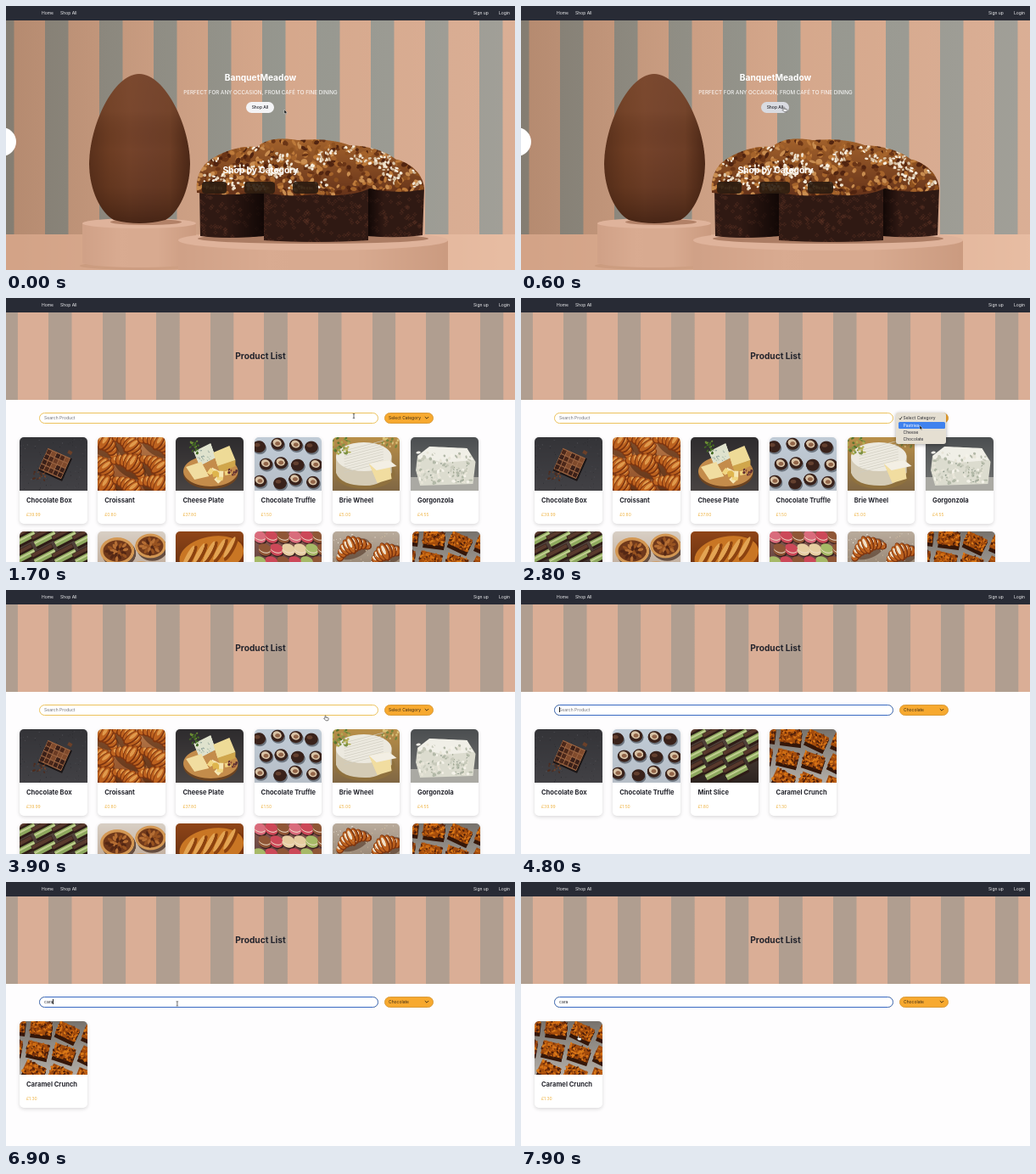
These frames come from a looping animation (600x311 px, 8000 ms). An HTML page with a canvas:

```html
<!DOCTYPE html>
<html lang="en">
<head>
<meta charset="utf-8">
<title>Food shop</title>
<style>
html, body { margin: 0; width: 100%; height: 100%; overflow: hidden; background: #fff; }
#stage { position: relative; width: 600px; height: 311px; overflow: hidden; background: #fefdfe;
  font: 5px/8px Inter, sans-serif; color: #24252d; }
#stage *, #stage ::before { box-sizing: border-box; }
#stage div, #stage canvas, #stage svg, #stage b { position: absolute; white-space: nowrap; }
.fill { inset: 0; }
.mid { left: 0; width: 600px; text-align: center; }
.big { font-size: 10.2px; line-height: 12px; font-weight: 700; }
.stripes { left: 0; top: 17px; width: 600px;
  background: repeating-linear-gradient(90deg, var(--grey) var(--a), var(--grey) var(--b), var(--tan) calc(var(--b) + 1px), var(--tan) var(--c)); }
.nav { left: 0; top: 0; width: 600px; height: 17px; background: #282b35; color: #f1f1f3; }
.nav div { top: 4px; }
.step { animation: 8s step-end infinite; }

/* Landing page */
#home { animation-name: home; color: #fff; background: #dcae90; }
#home .stripes { height: 252px; --grey: #96978f; --tan: #d6a88c; --a: -18px; --b: 9px; --c: 46px; }
#home .light { left: 0; top: 17px; width: 600px; height: 252px;
  background: linear-gradient(90deg, #50301a40, #50301a18 30%, #fff0 55%, #ffe4e01c); }
.button { left: 283px; top: 113px; width: 33px; height: 13px; border-radius: 7px; background: #f4f4f6;
  color: #24252d; text-align: center; line-height: 13.5px; font-weight: 500; animation-name: hover; }
.pill { top: 207px; height: 14px; border-radius: 4px; background: #2b1c10e8; color: #493522; text-align: center; line-height: 14px; }
.bubble { left: -22px; top: 143px; width: 34px; height: 34px; border-radius: 50%; background: #fff; }

/* Product list */
#shop .stripes { height: 102.5px; --grey: #b09e90; --tan: #daae96; --a: -13.6px; --b: 13.4px; --c: 50px; }
.search { left: 39px; top: 134.5px; width: 400px; height: 13px; border: 1px solid #ecc25c; border-radius: 7px; background: #fff; }
.focus { border: 1.4px solid #3869c2; animation-name: focus; }
.hint { left: 45px; top: 137px; color: #6e6f76; animation-name: hint; }
.typed { left: 45px; top: 137px; }
.typed span { font-size: 0; }
.typed i { border-left: .7px solid #222; font-size: 5px; animation-name: caret; }
.select { left: 446px; top: 134.5px; width: 58px; height: 13px; border-radius: 7px; background: #f7a92f; border: .5px solid #d99a38; }
.label { left: 451px; top: 137px; color: #3d2b14; }
.menu { left: 442px; top: 135px; width: 59px; height: 37px; border-radius: 3px; background: #e5dfd2;
  box-shadow: 0 1px 4px #0005; animation-name: menu; }
.menu div { left: 8.5px; }
.menu .lit { left: 3px; top: 11px; width: 54.5px; height: 8px; padding-left: 5.5px; border-radius: 1.5px; background: #3f82ee; color: #fff; }
.all { animation-name: all; }
.choc { animation-name: choc; }
.found { animation-name: found; }
.card { width: 79.5px; height: 102px; border-radius: 5px; background: #fff; box-shadow: 0 1.5px 4px #00000026; overflow: hidden; }
.card canvas { left: 0; top: 0; width: 79.5px; height: 63px; }
.card b { left: 8px; top: 70px; font-size: 7.6px; line-height: 10px; }
.card div { left: 8px; top: 86.5px; color: #eeb343; }

/* Pointer */
#pointer { left: 0; top: 0; width: 1px; height: 1px; animation: move 8s ease-in-out infinite; }
#pointer svg { left: -6px; top: -6px; width: 16px; height: 16px; }
@keyframes move {
  0%, 1% { transform: translate(328px, 122px); }
  6.25%, 17% { transform: translate(309.5px, 119px); }
  21.25% { transform: translate(410px, 139px); }
  27.5%, 30% { transform: translate(472px, 141px); }
  35%, 37.5% { transform: translate(470px, 150px); }
  41%, 43% { transform: translate(462px, 165px); }
  48.75% { transform: translate(376px, 148px); }
  54%, 85% { transform: translate(210px, 141px); }
  92.5%, 100% { transform: translate(67px, 181px); }
}
.arrow { animation-name: arrow; }
.hand { animation-name: hand; }
.beam { animation-name: beam; }
@keyframes arrow { 0%, 25% { opacity: 1; } 4%, 42%, 100% { opacity: 0; } }
@keyframes hand { 0%, 19%, 52% { opacity: 0; } 4%, 42%, 91%, 100% { opacity: 1; } }
@keyframes beam { 0%, 25%, 57%, 91%, 100% { opacity: 0; } 19%, 52%, 85% { opacity: 1; } }

@keyframes home { 0% { opacity: 1; } 8.75%, 100% { opacity: 0; } }
@keyframes hover { 0% { background: #f4f4f6; } 5%, 100% { background: #d9dbe1; } }
@keyframes all { 0%, 50%, 100% { opacity: 0; } 11.25% { opacity: 1; } }
@keyframes choc { 0%, 71.25%, 100% { opacity: 0; } 50% { opacity: 1; } }
@keyframes found { 0% { opacity: 0; } 71.25%, 100% { opacity: 1; } }
@keyframes menu { 0%, 41.25%, 100% { opacity: 0; } 28.75% { opacity: 1; } }
@keyframes before { 0% { opacity: 1; } 50%, 100% { opacity: 0; } }
@keyframes after { 0% { opacity: 0; } 50%, 100% { opacity: 1; } }
@keyframes focus { 0% { opacity: 0; } 53.75%, 100% { opacity: 1; } }
@keyframes hint { 0% { opacity: 1; } 61.25%, 100% { opacity: 0; } }
@keyframes caret { 0%, 88%, 96%, 100% { opacity: 0; } 53.75%, 92% { opacity: 1; } }
@keyframes key1 { 61.25%, 100% { font-size: 5px; } }
@keyframes key2 { 71.25%, 100% { font-size: 5px; } }
@keyframes key3 { 77.5%, 100% { font-size: 5px; } }
@keyframes key4 { 83.75%, 100% { font-size: 5px; } }
</style>
</head>
<body>
<div id="stage">
  <div id="shop" class="fill">
    <div class="stripes"></div>
    <div class="mid big" style="top:62px">Product List</div>
    <div class="search"></div>
    <div class="search focus step"></div>
    <div class="hint step">Search Product</div>
    <div class="typed"><span class="step" style="animation-name:key1">c</span><span class="step" style="animation-name:key2">a</span><span class="step" style="animation-name:key3">r</span><span class="step" style="animation-name:key4">a</span><i class="step"></i></div>
    <div class="select"></div>
    <div class="label step" style="animation-name:before">Select Category</div>
    <div class="label step" style="animation-name:after">Chocolate</div>
    <svg style="left:493px;top:138px" width="6" height="6"><path d="M.8 2L3 4.2L5.2 2" fill="none" stroke="#3d2b14" stroke-width=".9"/></svg>
    <div class="all fill step"></div>
    <div class="choc fill step"></div>
    <div class="found fill step"></div>
    <div class="menu step">
      <div style="top:2px">Select Category</div>
      <div class="lit">Pastries</div>
      <div style="top:19px">Cheese</div>
      <div style="top:27px">Chocolate</div>
      <svg style="left:3px;top:3.5px" width="5" height="5"><path d="M.8 2.8L2 4.2L4.2 .8" fill="none" stroke="#222" stroke-width=".8"/></svg>
    </div>
  </div>

  <div id="home" class="fill step">
    <div class="stripes"></div>
    <div class="light"></div>
    <canvas id="hero" style="left:0;top:0;width:600px;height:311px"></canvas>
    <div class="mid big" style="top:78px">BanquetMeadow</div>
    <div class="mid" style="top:97.5px;font-size:6.25px">PERFECT FOR ANY OCCASION, FROM CAFÉ TO FINE DINING</div>
    <div class="button step">Shop All</div>
    <div class="pill" style="left:231px;width:29px">Pastries</div>
    <div class="pill" style="left:281px;width:36px">Chocolate</div>
    <div class="pill" style="left:338px;width:30px">Cheese</div>
    <div class="mid big" style="top:187px">Shop by Category</div>
    <div class="bubble"></div>
  </div>

  <div class="nav">
    <div style="left:42px">Home</div><div style="left:64px">Shop All</div>
    <div style="left:551px">Sign up</div><div style="left:581px">Login</div>
  </div>

  <div id="pointer">
    <svg class="arrow step" viewBox="-6 -6 16 16"><path d="M0 0V5L1.2 4L2 5.8L2.9 5.4L2.1 3.7H3.6Z" fill="#111" stroke="#fff" stroke-width=".4"/></svg>
    <svg class="hand step" viewBox="-6 -6 16 16"><path d="M0 .5Q.6-.4 1.1.5V2.2L3.8 2.7Q4.4 3 4.2 4L3.6 5.8H1L-1.2 3.4Q-1 2.7 0 3.2Z" fill="#fff" stroke="#222" stroke-width=".6"/></svg>
    <svg class="beam step" viewBox="-6 -6 16 16"><path d="M-1.2-2.6Q0-2.6 0-2V2Q0 2.6-1.2 2.6M1.2-2.6Q0-2.6 0-2M0 2Q0 2.6 1.2 2.6" fill="none" stroke="#222" stroke-width=".7"/></svg>
  </div>
</div>

<script>
const TAU = Math.PI * 2;
let seed = 1;
const rand = (lo = 0, hi = 1) => {
  seed = seed * 16807 % 2147483647;
  return lo + (hi - lo) * seed / 2147483647;
};
const pick = list => list[Math.floor(rand(0, list.length))];
const repeat = (n, draw) => { for (let i = 0; i < n; i++) draw(i); };

function blob(c, x, y, rx, ry, fill, turn = 0) {
  c.fillStyle = fill;
  c.beginPath();
  c.ellipse(x, y, rx, ry, turn, 0, TAU);
  c.fill();
}
function shape(c, path, fill) {
  c.fillStyle = fill;
  c.fill(new Path2D(path));
}
function blend(gradient, ...colours) {
  colours.forEach((colour, i) => gradient.addColorStop(i / (colours.length - 1), colour));
  return gradient;
}
function placed(c, x, y, turn, draw) {
  c.save();
  c.translate(x, y);
  c.rotate(turn);
  draw();
  c.restore();
}
function block(c, x, y, w, h, turn, fill) {
  placed(c, x, y, turn, () => { c.fillStyle = fill; c.fillRect(-w / 2, -h / 2, w, h); });
}
function ground(c, top, bottom = top) {
  c.fillStyle = blend(c.createLinearGradient(0, 0, 0, 63), top, bottom);
  c.fillRect(0, 0, 80, 63);
}
function specks(c, n, x, y, w, h, size, colours) {
  repeat(n, () => blob(c, x + rand(0, w), y + rand(0, h), rand(.4, 1) * size, rand(.3, .7) * size, pick(colours), rand(0, 3)));
}
function croissant(c, x, y, size, turn, dust) {
  placed(c, x, y, turn, () => {
    blob(c, 1, 4 * size, 15 * size, 8 * size, '#3a1a0a77');
    for (const k of [-4, 4, -3, 3, -2, 2, -1, 1, 0]) {
      const px = k * 3.3 * size, py = k * k * .4 * size, tall = (8.5 - Math.abs(k) * 1.3) * size;
      blob(c, px, py, 3.6 * size, tall, '#7e3510', k * .12);
      blob(c, px - .4, py - .6, 2.7 * size, tall * .88, '#bd621f', k * .12);
      blob(c, px - .6, py - 2 * size, 1.4 * size, tall * .5, dust || '#e09a4c', k * .12);
    }
  });
}

const pictures = {
  box(c) {
    ground(c, '#343438', '#424145');
    specks(c, 90, 0, 0, 80, 63, .7, ['#55545a', '#29292d']);
    placed(c, 41, 31, .42, () => {
      block(c, 1, 1, 31, 29, 0, '#1a1516');
      block(c, 0, 0, 29, 27, 0, '#9a6442');
      repeat(20, i => block(c, -11.5 + i % 5 * 5.7, -9.6 + Math.floor(i / 5) * 6.4, 4.7, 5.2, 0, pick(['#4c281a', '#6b3b24', '#7f4a2c', '#3a2019'])));
    });
    specks(c, 18, 16, 38, 14, 14, 1.8, ['#70442c', '#4e2c1e']);
    block(c, 59, 18, 5, 4, .5, '#6b4029');
  },
  croissant(c) {
    ground(c, '#b97b4b', '#8a4b26');
    repeat(9, i => croissant(c, 8 + i % 3 * 32, 5 + Math.floor(i / 3) * 25 + i % 2 * 5, 1.4, .55 + i % 2 * .35));
  },
  cheese(c) {
    ground(c, '#2e2c2e', '#494443');
    blob(c, 41, 43, 32, 18, '#6d4421');
    blob(c, 41, 40, 32, 18, '#c48c4b');
    shape(c, 'M21 17L41 7L47 24L28 34Z', '#dfe2cd');
    specks(c, 22, 25, 15, 17, 13, 1.2, ['#8fa29b', '#b4c2ae']);
    shape(c, 'M44 18L63 10L70 27L49 34Z', '#eedb97');
    shape(c, 'M49 34L70 27V34L52 42Z', '#d0a64b');
    shape(c, 'M12 35L30 29L39 46L22 50Z', '#f1dda0');
    repeat(9, () => block(c, rand(37, 62), rand(39, 51), 7, 5, rand(0, 3), pick(['#f1d681', '#dfb54d', '#f6e7b4'])));
    specks(c, 18, 17, 4, 10, 16, 2, ['#6c8e34', '#446b24']);
    specks(c, 9, 62, 37, 10, 8, 2.5, ['#5c2d31', '#8d4a35']);
  },
  truffle(c) {
    ground(c, '#c1ccd7', '#b6bec7');
    repeat(12, i => {
      const row = Math.floor(i / 4), x = 8 + i % 4 * 20 + rand(-3, 3) + row % 2 * 5, y = 10 + row * 21 + rand(-3, 3);
      blob(c, x + 1, y + 2, 8, 7, '#6d757f');
      blob(c, x, y, 7.8, 7, '#39221b');
      if (i % 3) {
        blob(c, x - .5, y - 1, 5.3, 4.3, '#d8c2a5', .4);
        blob(c, x, y - .3, 3, 2.3, '#93664a');
      } else blob(c, x - 2, y - 2, 3.5, 2.3, '#64402f');
    });
  },
  brie(c) {
    ground(c, '#b98f49', '#806744');
    blob(c, 38, 43, 36, 18, '#8f713e');
    shape(c, 'M4 23H70V42Q56 58 38 57Q10 57 4 42Z', '#d4cbb5');
    blob(c, 37, 23, 33, 17, '#ece9df');
    repeat(9, i => block(c, 37, 10 + i * 3.2, 48, .6, -.25, '#d0cdc0'));
    shape(c, 'M43 31L67 27L70 49L53 54Z', '#f1dda0');
    shape(c, 'M43 31L67 27L76 34L52 39Z', '#f3efe4');
    specks(c, 38, 0, 0, 20, 20, 2.4, ['#58752e', '#809445', '#b2ad52']);
    specks(c, 16, 59, 0, 20, 12, 2.4, ['#dac27a', '#75843d']);
  },
  gorgonzola(c) {
    ground(c, '#4b4e50', '#757675');
    shape(c, 'M0 47H80V63H0Z', '#aaa9a3');
    shape(c, 'M8 22L22 11L66 13L76 29L73 55L11 57L6 39Z', '#dcdccf');
    shape(c, 'M8 22L22 11L66 13L74 27L39 30Z', '#f0efe7');
    specks(c, 100, 9, 18, 62, 37, 2.7, ['#f4f2e9', '#c8cabb', '#e8e5d8', '#b3b9a8']);
    specks(c, 20, 12, 28, 57, 25, 1.4, ['#8d988a', '#a5ac98']);
  },
  mint(c) {
    ground(c, '#5b4a42', '#2d2420');
    repeat(11, i => placed(c, 5 + i % 4 * 24, 7 + Math.floor(i / 4) * 21, -.48, () => {
      block(c, 0, 0, 27, 17, 0, '#2e1c17');
      block(c, 0, 2, 27, 7, 0, '#8da85e');
      block(c, 0, 1, 27, 2, 0, '#c2cf91');
      block(c, 0, -6, 26, 4, 0, '#593a2d');
    }));
  },
  tart(c) {
    ground(c, '#d8cfc5', '#b69d87');
    for (const [x, y, r] of [[23, 23, 20], [62, 17, 18], [51, 52, 21], [6, 57, 17]]) {
      blob(c, x + 2, y + 3, r, r * .82, '#654d40');
      blob(c, x, y, r, r * .8, '#d39753');
      blob(c, x, y, r * .83, r * .63, '#70391b');
      repeat(20, i => blob(c, x + Math.cos(i * 2.4) * r * .14 * Math.sqrt(i), y + Math.sin(i * 2.4) * r * .11 * Math.sqrt(i), 3.3, 1.7, pick(['#985321', '#542714', '#b56e34']), i * 2.4));
    }
  },
  loaf(c) {
    ground(c, '#8f4518', '#57280f');
    blob(c, 44, 31, 41, 25, '#7a360d', -.2);
    blob(c, 42, 28, 38, 22, '#c97624', -.2);
    repeat(5, i => {
      blob(c, 17 + i * 12, 31 - i * 2.6, 3.7, 16, '#8c420f', .5);
      blob(c, 15 + i * 12, 29 - i * 2.6, 2.6, 14, '#e3a453', .5);
    });
  },
  macaron(c) {
    ground(c, '#8b5d52', '#463034');
    repeat(24, i => {
      const x = 6 + i % 6 * 14 + Math.floor(i / 6) % 2 * 6, y = 6 + Math.floor(i / 6) * 15;
      const colour = pick(['#d96c7c', '#a6b967', '#8f5636', '#e6cda1', '#cc4858', '#b98ba5']);
      blob(c, x + 1, y + 3, 8, 6, '#39211f', .3);
      blob(c, x, y + 2, 7.5, 5.5, colour, .3);
      blob(c, x, y, 7.2, 4.5, '#f1e1cb', .3);
      blob(c, x, y - 1.5, 7.5, 5, colour, .3);
    });
  },
  pastry(c) {
    ground(c, '#b9ab9c', '#877461');
    for (const [x, y] of [[22, 16], [62, 24], [28, 48], [70, 59]]) croissant(c, x, y, 1.35, -.4, '#efdfc7');
    specks(c, 80, 0, 0, 80, 63, .8, ['#f6eee2', '#dfc6a3']);
  },
  caramel(c) {
    ground(c, '#77726c', '#b3aea8');
    repeat(12, i => {
      const row = Math.floor(i / 4);
      placed(c, -6 + i % 4 * 31 - row * 4, 4 + row * 25 + i % 4 * 4, .3 + rand(-.2, .2), () => {
        block(c, 1, 4, 25, 17, 0, '#351608');
        block(c, 0, 0, 25, 16, 0, '#a34c0c');
        specks(c, 75, -12.5, -8, 25, 16, 2.2, ['#db7a18', '#b95b0e', '#7a330b', '#d46f16', '#4f1f0a']);
      });
    });
  }
};

function prepare(canvas, w, h) {
  canvas.width = w * 2;
  canvas.height = h * 2;
  const c = canvas.getContext('2d');
  c.scale(2, 2);
  return c;
}

function addCard(group, column, row, name, price, picture) {
  const card = document.createElement('div');
  card.className = 'card';
  card.style.left = 16 + column * 92.2 + (row && column === 5 ? 2 : 0) + 'px';
  card.style.top = 164 + row * 111 + 'px';
  card.innerHTML = `<canvas></canvas><b>${name}</b><div>£${price}</div>`;
  document.querySelector(group).append(card);
  seed = 4217;
  pictures[picture](prepare(card.firstChild, 79.5, 63));
}

const products = [
  ['Chocolate Box', '39.99', 'box'], ['Croissant', '0.80', 'croissant'], ['Cheese Plate', '37.80', 'cheese'],
  ['Chocolate Truffle', '1.50', 'truffle'], ['Brie Wheel', '5.00', 'brie'], ['Gorgonzola', '4.55', 'gorgonzola'],
  ['Mint Slice', '1.80', 'mint'], ['Pecan Tart', '2.50', 'tart'], ['Brioche Loaf', '4.20', 'loaf'],
  ['Macarons', '6.50', 'macaron'], ['Almond Pastry', '2.10', 'pastry'], ['Caramel Crunch', '1.30', 'caramel']
];
products.forEach((p, i) => addCard('.all', i % 6, Math.floor(i / 6), ...p));
[0, 3, 6, 11].forEach((p, i) => addCard('.choc', i, 0, ...products[p]));
addCard('.found', 0, 0, ...products[11]);

function pedestal(c, x, y, rx, ry, depth) {
  const side = blend(c.createLinearGradient(x - rx, 0, x + rx, 0), '#d0a187', '#d9ab91', '#d8aa90', '#cb9b80');
  blob(c, x, y + depth, rx, ry, side);
  c.fillRect(x - rx, y, rx * 2, depth);
  blob(c, x, y, rx, ry, '#dfb39b');
}

function drawEgg(c) {
  const egg = 'M157 80C188 80 217 142 217 186C217 217 203 244 188 252Q157 260 127 252C112 244 98 217 98 186C98 142 126 80 157 80Z';
  c.save();
  c.clip(new Path2D(egg));
  shape(c, egg, blend(c.createLinearGradient(98, 0, 217, 0), '#5a311c', '#6d3d23', '#75432a', '#70402a', '#6d3e26', '#4c2817'));
  c.fillStyle = blend(c.createLinearGradient(0, 80, 0, 257), '#8a573a50', '#8a573a40', '#3a1c0e00', '#3a1c0e30', '#2a120899');
  c.fillRect(98, 80, 120, 178);
  c.restore();
}

function drawHero(c) {
  seed = 77;
  c.fillStyle = blend(c.createLinearGradient(0, 0, 600, 0), '#d3a387', '#dcae93', '#e8bda3');
  c.fillRect(0, 269, 600, 42);
  blob(c, 160, 306, 73, 5, '#b07f6244');
  pedestal(c, 157, 256, 67, 6, 46);
  blob(c, 165, 254.5, 42, 3.5, '#8b573b88');
  drawEgg(c);
  pedestal(c, 362, 276, 159, 12, 60);
  blob(c, 362, 274, 136, 6, '#80503688');

  // Paper moulds
  c.save();
  c.clip(new Path2D('M228 214H493L491 270Q460 274 427 271V276Q365 280 304 276V271Q260 275 229 271Z'));
  c.fillStyle = '#2f1913';
  c.fillRect(220, 200, 280, 90);
  repeat(270, () => {
    const x = rand(228, 493), y = rand(222, 278);
    repeat(4, k => blob(c, x + Math.cos(k * 1.57) * 1.5, y + Math.sin(k * 1.57) * 1.5, 1, .8, '#64382866'));
  });
  for (const [from, to] of [[260, 304], [445, 427]]) {
    c.fillStyle = blend(c.createLinearGradient(from, 0, to, 0), '#0d050400', '#0d0504dd');
    c.fillRect(Math.min(from, to), 214, Math.abs(to - from), 62);
  }
  c.restore();

  // Baked crust with almonds and sugar
  c.save();
  const crust = 'M225 220Q222 191 246 178Q270 164 296 166Q312 152 344 158Q382 155 405 164Q438 165 459 180Q491 190 493 216Q461 222 429 215Q405 226 366 222Q328 226 302 219Q260 225 225 220Z';
  c.clip(new Path2D(crust));
  shape(c, crust, blend(c.createLinearGradient(0, 155, 0, 223), '#a4632c', '#66331a'));
  specks(c, 620, 224, 155, 270, 68, 4.5, ['#8d501f', '#bd7a3a', '#512410', '#a5632b', '#6b3516', '#c98d50']);
  repeat(46, () => {
    const x = rand(228, 490), y = rand(166, 214);
    repeat(7, () => blob(c, x + rand(-8, 8), y + rand(-5, 5), rand(1.2, 2.4), rand(.9, 1.7), pick(['#f0e4d2', '#f8efdf', '#d9c3a6']), rand(0, 3)));
  });
  c.restore();
}
drawHero(prepare(document.querySelector('#hero'), 600, 311));
</script>
</body>
</html>
```
